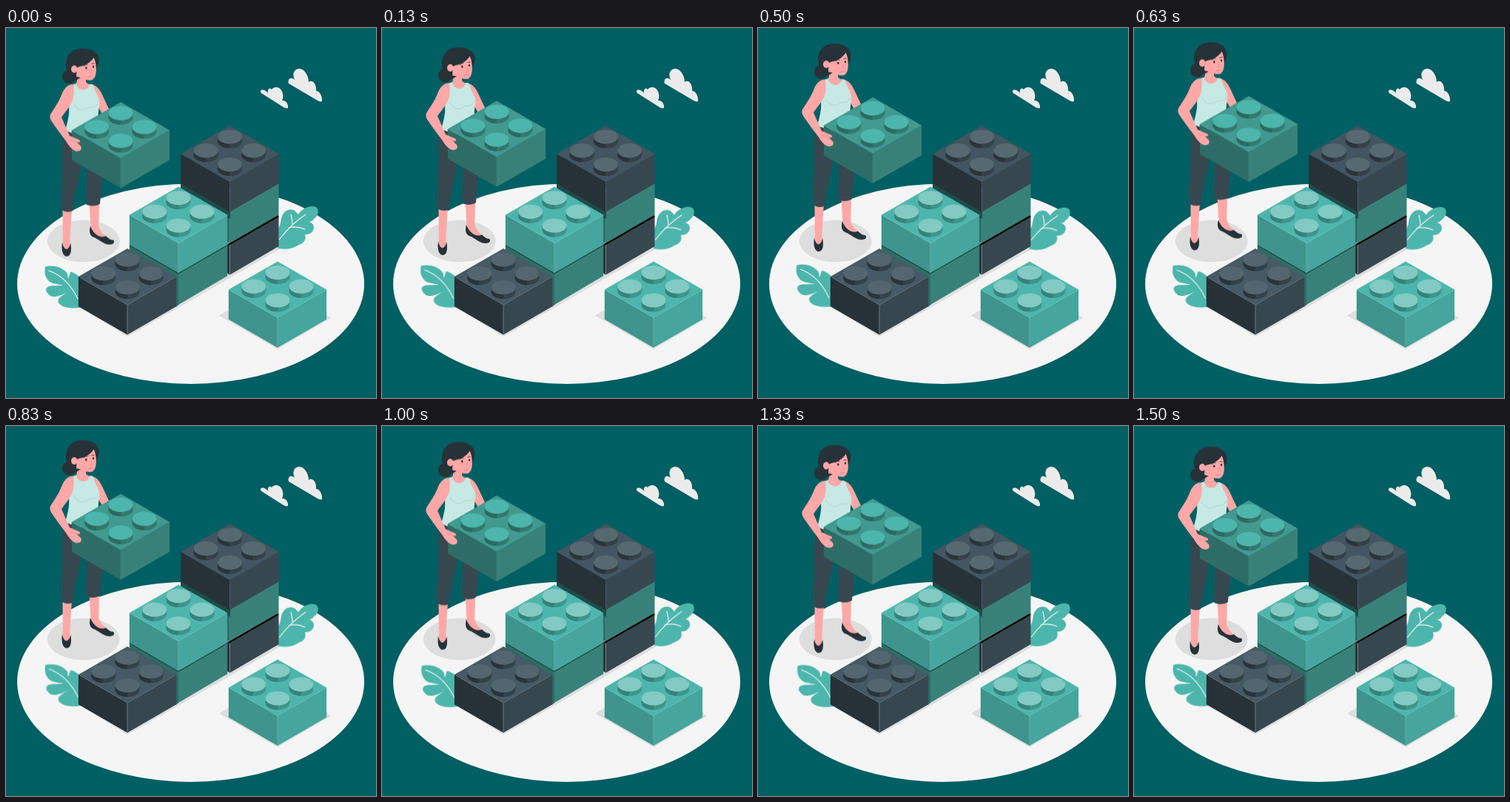
An HTML page for the animation above (1.54 s loop, 500 by 500 pixels).

```html
<!DOCTYPE html>
<html lang="en">
<head>
<meta charset="utf-8">
<title>Building blocks</title>
<style>
html, body { margin: 0; width: 100%; height: 100%; overflow: hidden; background: #005f63; }
svg { display: block; width: 100vw; height: 100vh; }
.sway { transform-origin: 250px 250px; }
.line { fill: none; stroke-linecap: round; stroke-linejoin: round; }
</style>
</head>
<body>
<svg id="stage" viewBox="0 0 500 500"></svg>
<script>
const LOOP = 1540;
const W = 66.2, H = 38.1, WALL = 40.2;
const SKIN = '#ffa8a7', INK = '#263238', SLATE = '#37474f', LEAF = '#4db6ac', CLOUD = '#ebebeb';
const SHADE = '#1f4c49', TEAL_LEFT = '#2e6d67', TEAL_RIGHT = '#388179';

const path = (d, fill) => `<path d="${d}" fill="${fill}"/>`;
const line = (d, stroke, width = 1) => `<path class="line" d="${d}" stroke="${stroke}" stroke-width="${width}"/>`;
const oval = (x, y, rx, ry, fill) => `<ellipse cx="${x}" cy="${y}" rx="${rx}" ry="${ry}" fill="${fill}"/>`;

// Palettes: top, left wall, right wall, stud top, stud left, stud right, front edge
const LIGHT = ['#4db6ac', '#3f958d', '#46a59c', '#82cac3', '#37827b', '#3f948c', '#62b8b0'];
const MID = ['#41998f', TEAL_LEFT, TEAL_RIGHT, LEAF, '#2c6963', '#34786f', TEAL_RIGHT];
const DARK = ['#455a64', INK, SLATE, '#53666f', '#28343a', '#33424a', '#87939a'];
const GREY = ['#435560', INK, SLATE, '#566870', '#28343a', '#344148', '#45545c'];

function stud(x, y, c) {
  const rx = 16.5, ry = 9.6, h = 6;
  return path(`M${x - rx},${y}v${h}a${rx},${ry} 0 0 0 ${rx},${ry}V${y}z`, c[4]) +
    path(`M${x + rx},${y}v${h}a${rx},${ry} 0 0 1 ${-rx},${ry}V${y}z`, c[5]) +
    oval(x, y, rx, ry, c[3]);
}

// x, y is the back corner of the top face
function brick(x, y, c) {
  const studs = [[0, 15], [-32.3, 33.7], [32, 33.7], [0, 52.5]];
  return path(`M${x - W},${y + H}l${W},${H}v${WALL}l${-W},${-H}z`, c[1]) +
    path(`M${x + W},${y + H}l${-W},${H}v${WALL}l${W},${-H}z`, c[2]) +
    path(`M${x},${y}l${W},${H}l${-W},${H}l${-W},${-H}z`, c[0]) +
    line(`M${x},${y + 2 * H + .5}v${WALL - 2}`, c[6], .7) +
    studs.map(([dx, dy]) => stud(x + dx, y + dy, c)).join('');
}

const ground =
  oval(249.6, 345.7, 234.5, 135.2, '#f5f5f5') +
  oval(104.7, 288, 48.7, 28.3, '#dedede') +
  path('M288,388.5L304,379L428,382L439,392L367,434z', '#dedede') +
  path('M96,375L164,417L233,378L302,338L371,298L360,290L160,350z', '#dedede');

const clouds =
  path('M382,75C380,69 385,65 390,70C386,61 390,55 397,55C404,56 409,65 409,73C414,69 420,76 419,85C424,85 428,93 427,99C426,100 423,99 421,98z', CLOUD) +
  path('M345,88C341,83 349,81 354,88C353,83 356,80 359,83C362,79 369,79 372,84C375,89 375,94 373,98C378,97 382,103 381,108C379,109 377,108 375,107z', CLOUD);

const leafLeft =
  path('M53,322.5C64,319.5 77,323 83,332L84,339L87,329.5C95,331 101,337 104,344L106,376C96,380 81,379 75,375C69,371 69,367 74,363L84,356C76,361 66,365 60,362C55,358 52,354 56,350C62,347 71,349 77,347.5C67,346 60,345 57,341C52,335 52,330 53,322.5z', LEAF) +
  line('M58,328C75,334 88,347 97,366', '#f5f5f5', 1.1);

const leafRight =
  path('M367,297L367,272C371,267 371,262 372,257C374,248 382,243 389,246C392,248 393,250 395,252C400,243 412,239 419,242C424,246 422,254 416,258C414,261 411,262 409,262C416,263 418,270 414,275C411,279 407,279 404,279C406,285 403,290 398,292C392,295 389,297 384,298C377,299 371,299 367,297z', LEAF) +
  line('M369,286C380,272 391,261 405,252M387,265C387,260 386,256 385,252M382,270C389,268 397,269 404,272', '#f5f5f5', 1.1);

const stack =
  // right column, bottom to top
  path('M298,290L302.5,292.5V333.5L298,331z', INK) +
  path('M302.5,292.5L368.5,254.5V295L302.5,333.5z', SLATE) +
  line('M302.5,295V332', '#87939a', .7) +
  path('M298,246L301,249V291L298,289z', '#2a625d') +
  path('M301,247L368.5,208V253L301,291z', TEAL_RIGHT) +
  line('M302,292L367.5,254.5', '#000', 2.5) +
  path('M236,207L303,246V258L236,220z', SHADE) +
  brick(302.5, 132, GREY) +
  // middle column
  path('M229,329L233,329V374.5L229,377z', TEAL_LEFT) +
  path('M233,329L299.2,291V335L233,374z', TEAL_RIGHT) +
  path('M166.8,290L233,328V340L166.8,302z', TEAL_LEFT) +
  line('M168,294L233,331.5L299,293.5', SHADE, 1.8) +
  brick(233, 214.5, LIGHT) +
  brick(164, 298, DARK) +
  brick(367, 315.5, LIGHT);

const legs =
  path('M76.5,245H89L86.5,283V300H77z', SKIN) +
  path('M112.5,237H126L125.3,268C128,277 133,280 138,284L132,289L115,278z', SKIN) +
  path('M76,290C78,302 85,302 87.2,291C89,300 88,309 82,309C76,308.5 74.5,299 76,290z', INK) +
  path('M114,268C112,275 113,281 118,283C125,285 131,293 140,293C146,293 147.5,289 145,287C141,287 138,284 135,281.5C127,285 118,279 114,268z', INK) +
  path('M106,180H130C131,205 128,222 127,238C122,241.5 114,241.5 108.5,239C108,222 110,210 109,190z', SLATE) +
  path('M78,138C75,160 77,182 76,203C75,220 75,234 75,246C80,249.5 86,249.5 90,247.5C92,222 99,206 101,188L112,150z', SLATE);

const torso =
  path('M116,77C125,78 129,88 133,97L141,114L132,120L121,101z', SKIN) +
  path('M95,60L108,64L108,73C110,77 115,76 118,77L115,90H91L90,77C94,76 96,75 96,71z', SKIN) +
  path('M91,76.5L94.5,75.5C97,86 111,87 113.5,76L118,77C119,87 126,92 126.5,101C126,108 124,114 125,122L100,146L80,139C84,125 86,116 85,106C88,98 92,91 91,76.5z', '#c7e9e5') +
  line('M92,103C96,113 108,113 112,107C117,109 123,106 125,101', '#a6d5cf', .9);

const head =
  oval(85.5, 66, 9.5, 9.3, INK) +
  path('M95,71C85,67 80,57 81,47C83,34 92,28 103,28C116,28 125,34 125.5,43C125.5,48 124,52 122,56L108,63z', INK) +
  path('M96,50C105,49 114,46 119,40C121,45 122,51 121.8,58C121.5,66 119,70.5 114,71C110,71 106,70 103,68L95,66z', SKIN) +
  oval(92.3, 56, 4.3, 5, SKIN) +
  path('M94,48L119,39C117,44 112,48 108,49L112,48C105,52 99,52 96,54z', INK) +
  path('M118,39L123,38L122.5,53C121.5,47 120.5,43 118,39z', INK) +
  line('M111,67C113,66 114,65.5 116,65.5', '#d96c74', .8) +
  line('M114.6,56L116.5,60.5L114.2,61', '#ee8588', .8) +
  line('M105,52C106.5,50 108.5,49.5 110,49.8M116,48.5L119.5,48', INK, .8) +
  oval(108.3, 54.3, 1.3, 1.6, INK) + oval(118, 52.5, 1.2, 1.5, INK);

const arm =
  path('M91,76.5C84,76 78,82 75,91C71,101 65,109 60,117C58.5,121 60,124 62,127C68,136 74,144 81,153C85,160 90,166 96,167C101,167 103,164 101,160L96,155L100,154.5C101,152 98,151 94,149.5C91,148 88,147 86,146C82,137 78,128 75,121C80,114 87,106 90,98C92,92 92,84 91,76.5z', SKIN) +
  line('M88,152C92,153 95,154 98,155', '#ee8588', .7);

document.getElementById('stage').innerHTML =
  '<rect width="500" height="500" fill="#005f63"/>' + ground + clouds +
  `<g class="sway">${leafLeft}</g><g class="sway">${leafRight}</g>` + stack +
  `<g id="float">${legs}${torso}${head}${brick(155, 100.4, MID)}${arm}</g>`;

const forever = { duration: LOOP, iterations: Infinity, easing: 'linear' };
document.getElementById('float').animate(
  [0, -10, 0].map(y => ({ transform: `translateY(${y}px)` })),
  { ...forever, delay: -30 });

const sway = [[0, 0], [.25, .85], [.75, -.85], [1, 0]]
  .map(([offset, deg]) => ({ offset, transform: `rotate(${deg}deg)` }));
document.querySelectorAll('.sway').forEach(el => el.animate(sway, forever));
</script>
</body>
</html>
```
